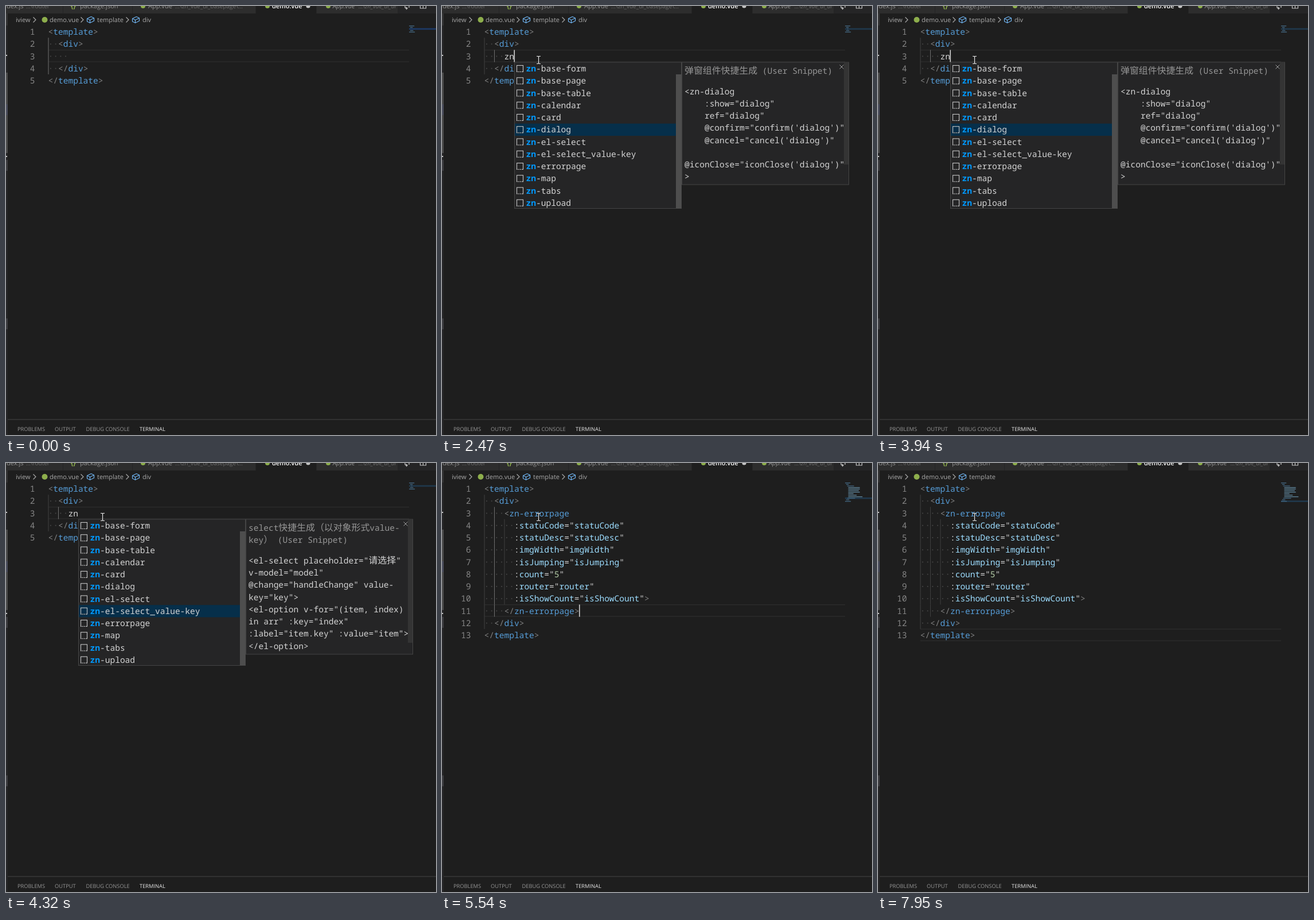
These frames come from a looping animation (750 px wide and 747 px high, 8 s). An HTML page with a canvas:

```html
<!DOCTYPE html>
<html lang="zh">
<head>
<meta charset="utf-8">
<title>Snippet completion</title>
<style>
html, body { margin: 0; width: 100%; height: 100%; overflow: hidden; background: #1e1e1e; }
canvas { display: block; }
</style>
</head>
<body>
<canvas id="stage" width="750" height="747"></canvas>
<script>
const g = document.getElementById('stage').getContext('2d');
const LOOP = 8000, CW = 8.736, LH = 21.25, LEFT = 73.5, TOP = 34;
const MONO = '14.56px "Noto Sans Mono", monospace';
const CJK = '15.9px "Noto Sans CJK SC", "Noto Sans CJK", sans-serif';
const UI = '"Open Sans", "Noto Sans", sans-serif';
const PLAIN = '#d4d4d4', GREEN = '#8dae4c';

const BLANK = ['<template>', '  <div>', '    ', '  </div>', '</template>'];
const ATTRS = ['statuCode="statuCode"', 'statuDesc="statuDesc"', 'imgWidth="imgWidth"',
  'isJumping="isJumping"', 'count="5"', 'router="router"', 'isShowCount="isShowCount">'].map(a => ':' + a);
const withLine = (...lines) => [...BLANK.slice(0, 2), ...lines, ...BLANK.slice(3)];
const DONE = withLine('    <zn-errorpage', ...ATTRS.map(a => '      ' + a), '    </zn-errorpage>');

const ITEMS = ['base-form', 'base-page', 'base-table', 'calendar', 'card', 'dialog', 'el-select',
  'el-select_value-key', 'errorpage', 'map', 'tabs', 'upload'];
const SNIPPETS = {
  4: { bottom: 311, bar: 276, title: ['卡片组件快捷生成 (User Snippet)'],
    code: ['<zn-card', '    :title="title"', '    ref="card"', '    :width="width"', '    :height="height"',
      '    @click="handleClick"', '>', '    <div></div>', '</zn-card>'] },
  5: { bottom: 311, bar: 276, title: ['弹窗组件快捷生成 (User Snippet)'],
    code: ['<zn-dialog', '    :show="dialog"', '    ref="dialog"', '    @confirm="confirm(\'dialog\')"',
      '    @cancel="cancel(\'dialog\')"', '', '@iconClose="iconClose(\'dialog\')"', '>', '    <div slot="dialog">'] },
  6: { bottom: 290, bar: 270, title: ['select快捷生成 (User Snippet)'],
    code: ['<el-select placeholder="请选择"', 'v-model="model"', '@change="handleChange">',
      '<el-option v-for="(item, index)', 'in arr" :key="index"', ':label="item" :value="item">', '</el-option>'] },
  7: { bottom: 333, bar: 313, title: ['select快捷生成（以对象形式value-', 'key） (User Snippet)'],
    code: ['<el-select placeholder="请选择"', 'v-model="model"', '@change="handleChange" value-', 'key="key">',
      '<el-option v-for="(item, index)', 'in arr" :key="index"', ':label="item.key" :value="item">', '</el-option>'] },
  8: { bottom: 353, bar: 333, title: ['错误页面组件快捷生成 (User', 'Snippet)'],
    code: ['<zn-errorpage', ...ATTRS.map(a => '    ' + a), '</zn-errorpage>'] }
};

// Timelines: first entry of each row is the time in ms
const DOCS = [[0, BLANK], [2320, withLine('    z')], [2390, withLine('    zn')], [5540, DONE]];
const PICKS = [[0, 0], [2390, 5], [3400, 4], [3940, 5], [4010, 6], [4320, 7], [4630, 8], [5540, 0]];
const CRUMBS = [[0, 2], [5930, 3], [6790, 2], [7190, 1]];
// time, row, column, opacity
const CARET = [[0, 2, 4, 0], [690, 3, 4, 1], [1190, 2, 4, 1], [1690, 2, 4, .12], [2320, 2, 5, 1], [2390, 2, 6, 1],
  [3090, 2, 6, 0], [3630, 2, 6, 1], [4170, 2, 6, 0], [4630, 2, 6, 1], [5010, 2, 6, 0], [5540, 10, 19, 1],
  [6180, 10, 19, 0], [6790, 11, 8, 1], [7190, 12, 11, 1], [7800, 12, 11, 0]];

const clamp = v => Math.max(0, Math.min(1, v));
const mix = (a, b, k) => a + (b - a) * k;
const indexAt = (keys, t) => keys.findLastIndex(k => k[0] <= t);
const valueAt = (keys, t) => keys[indexAt(keys, t)][1];
const indentOf = s => s.search(/\S|$/);

function rect(x, y, w, h, color) {
  g.fillStyle = color;
  g.fillRect(x, y, w, h);
}

function dot(x, y, r, color) {
  g.fillStyle = color;
  g.beginPath();
  g.arc(x, y, r, 0, 7);
  g.fill();
}

function stroke(path, color, width = 1) {
  g.strokeStyle = color;
  g.lineWidth = width;
  g.stroke(new Path2D(path));
}

function text(s, x, y, color, font = MONO) {
  g.font = font;
  g.fillStyle = color;
  g.fillText(s, x, y);
}

// Mixed Latin and Chinese line
function mixed(s, x, y, color) {
  for (const run of s.split(/([^\x00-\xff]+)/)) {
    text(run, x, y, color, /[^\x00-\xff]/.test(run) ? CJK : MONO);
    x += g.measureText(run).width;
  }
}

function label(s, x, y, size, color, style = '') {
  text(s, x, y, color, `${style} ${size}px ${UI}`);
}

function drawTabs() {
  rect(0, 0, 750, 13, '#252526');
  for (const [x, end] of [[0, 99], [100, 220], [221, 435], [542, 683]]) rect(x, 0, end - x, 13, '#2d2d2d');
  rect(436, 0, 105, 13, '#1e1e1e');
  const dim = '#929292', path = '#6c6c6c';
  label('dex.js', 1, 4, 11, dim);
  label('...\\router', 35, 4, 10, path);
  label('{}', 113, 4, 11, GREEN, 'bold');
  label('package.json', 129, 4, 11, dim);
  for (const x of [239, 456, 562]) dot(x, 0, 4, GREEN);
  label('App.vue', 248, 4, 11, dim);
  label('...\\zn_vue_ui_basepage\\...', 295, 4, 10, path);
  label('demo.vue', 464, 4, 11, '#ffffff', '600');
  dot(527, 0, 3.6, '#c5c5c5');
  label('App.vue', 570, 4, 11, dim, 'italic');
  g.save();
  g.beginPath();
  g.rect(600, 0, 83, 13);
  g.clip();
  label('...\\zn_vue_ui_ui', 615, 4, 10, path, 'italic');
  g.restore();
  stroke('M696 0V2Q696 4 699 4M698 2L700 4L698 6M703 0V3', '#c5c5c5', 1.3);
  stroke('M722.5 0V4H732.5V0M727.5 0V4', '#c5c5c5', 1.2);
}

function drawCrumbs(depth) {
  const gray = '#a9a9a9';
  const chevron = x => stroke(`M${x - 2.5} 19.5L${x + 2} 24L${x - 2.5} 28.5`, gray, 1.2);
  label('iview', 17, 28, 11, gray);
  chevron(50);
  dot(67.5, 24, 5, GREEN);
  label('demo.vue', 76, 28, 11, gray);
  const names = [[133, 'template'], [212, 'div'], [261, 'zn-errorpage']];
  for (const [x, name] of names.slice(0, depth)) {
    chevron(x);
    const c = x + 14.5;
    stroke(`M${c - 6} 22L${c + 1} 18.5L${c + 6} 21V26L${c - 1} 29.5L${c - 6} 27ZM${c - 6} 22L${c - 1} 24.5L${c + 6} 21M${c - 1} 24.5V29.5`, '#75beff', 1.1);
    label(name, x + 26, 28, 11, gray);
  }
}

function drawEdges() {
  rect(0, 13, 3, 734, '#252526');
  rect(0, 13, 3, 21, '#333334');
  rect(0, 116, 3, 140, '#4b4b4b');
  rect(0, 171, 3, 19, '#4a4d5c');
  rect(0, 268, 3, 19, '#3c3c40');
  rect(0, 544, 3, 19, '#3c3c40');
  for (const y of [85, 261]) rect(0, y, 2, 2, '#c8c8c8');
  rect(3, 719.5, 747, 1, '#454545');
  [['PROBLEMS', 20], ['OUTPUT', 85], ['DEBUG CONSOLE', 139.5]].forEach(([s, x]) => label(s, x, 740, 9.3, '#969696'));
  label('TERMINAL', 233, 740, 9.3, '#e7e7e7');
}

function drawLine(line, row) {
  const base = TOP + row * LH + 16, pad = indentOf(line);
  const n = String(row + 1);
  text(n, 50.5 - n.length * CW, base, '#858585');
  for (let i = 0; i < pad; i++) dot(LEFT + (i + .5) * CW, base - 5, 1, '#484848');
  let before = '';
  for (const { 0: token, index } of line.matchAll(/<\/?|>|[":=]|[\w-]+/g)) {
    let color = PLAIN;
    if (/[<>]/.test(token)) color = '#808080';
    else if (/\w/.test(token) && before)
      color = before[0] === '<' ? '#569cd6' : /^\d/.test(token) ? '#b5cea8' : '#9cdcfe';
    text(token, LEFT + index * CW, base, color);
    before = token;
  }
}

function drawGuides(doc, row) {
  const depths = doc.map(s => s.trim() ? indentOf(s) : 2);
  const active = depths[row] - 2;
  depths.forEach((depth, i) => {
    for (let c = 0; c < depth; c += 2)
      rect(LEFT + c * CW, TOP + i * LH, 1, LH, c === active ? '#707070' : '#404040');
  });
}

function drawMinimap(doc, row, t) {
  const step = 2.67;
  rect(703, 38.6 + (row - 2) * step, 47, 2.7, t < 70 ? '#1d3a66' : '#20384c');
  doc.forEach((line, i) => {
    const pad = indentOf(line);
    rect(703 + pad * .92, TOP + i * step, (line.length - pad) * .92, 1.4, line.includes('=') ? '#5b7f94' : '#41637c');
  });
}

function drawList(pick) {
  rect(126, 97.5, 292, 255.5, '#454545');
  rect(127, 98.5, 290, 253.5, '#252526');
  rect(127, 98.5 + pick * LH, 281, LH, '#062f4a');
  rect(408, 119, 9.5, 233, '#4e4e4e');
  ITEMS.forEach((name, i) => {
    const y = 109 + i * LH;
    g.strokeStyle = '#c5c5c5';
    g.lineWidth = 1.1;
    g.strokeRect(130.5, y - 5.5, 11, 11);
    for (let x = 132; x < 141; x += 3) rect(x, y + 4.5, 1, 2, '#252526');
    text('zn', 146.5, y + 5, '#0097fb', 'bold ' + MONO);
    text('-' + name, 146.5 + 2 * CW, y + 5, PLAIN);
  });
}

function drawDetails({ title, code, bottom, bar }) {
  rect(418, 97.5, 292, bottom - 97, '#454545');
  rect(419, 98.5, 290, bottom - 99, '#252526');
  rect(701, 98.5, 8, bar - 98.5, '#343434');
  g.save();
  g.beginPath();
  g.rect(419, 98, 290, bottom - 98.5);
  g.clip();
  title.forEach((s, i) => mixed(s, 423, 118 + i * LH, '#969696'));
  const first = 118 + (title.length - 1) * LH + 35.5;
  code.forEach((s, i) => mixed(s, 423, first + i * LH, PLAIN));
  g.restore();
  stroke('M693.5 102.5l7 7m0 -7l-7 7', '#a0a0a0', 1);
}

function drawPointer(t) {
  if (t < 70) return;
  const enter = clamp((t - 70) / 620), back = clamp((t - 1070) / 310);
  const ease = 1 - (1 - enter) ** 2;
  const x = mix(mix(400, 97, ease), 168.5, back), y = mix(mix(578, 111, ease), 94, back);
  g.save();
  g.translate(x, y);
  stroke('M-3.5 -6.5H-1L0 -5.5L1 -6.5H3.5M0 -5.5V5.5M-3.5 6.5H-1L0 5.5L1 6.5H3.5', '#e4e4e4', 1.2);
  g.restore();
}

function draw() {
  const t = performance.now() % LOOP;
  const doc = valueAt(DOCS, t), pick = valueAt(PICKS, t);
  const k = indexAt(CARET, t), [start, row, col, opacity] = CARET[k], last = CARET[k - 1];
  const y = TOP + row * LH;

  rect(0, 0, 750, 747, '#1e1e1e');
  drawTabs();
  drawCrumbs(valueAt(CRUMBS, t));
  drawEdges();

  rect(LEFT, y - .5 + LH * 0, 629.5, 1.5, '#2b2b2b');
  rect(LEFT, y + LH - 1.5, 629.5, 1.5, '#2b2b2b');
  if (t >= 840 && t < 1190) {
    const shade = `rgba(73,73,73,${.72 * clamp((t - 800) / 120)})`;
    rect(LEFT + 3 * CW, TOP + LH, 3 * CW, LH, shade);
    rect(LEFT + 4 * CW, TOP + 3 * LH, 3 * CW, LH, shade);
  }
  drawGuides(doc, row);
  doc.forEach(drawLine);
  drawMinimap(doc, row, t);

  const same = last && last[1] === row && last[2] === col;
  g.globalAlpha = same ? mix(last[3], opacity, clamp((t - start + 40) / 110)) : opacity;
  rect(LEFT + col * CW - .5, y, 1.6, LH, '#d0d0d0');
  g.globalAlpha = 1;

  if (pick) {
    drawList(pick);
    if (t >= 2470) drawDetails(SNIPPETS[pick]);
  }
  drawPointer(t);
  requestAnimationFrame(draw);
}

g.textRendering = 'geometricPrecision';
draw();
</script>
</body>
</html>
```
